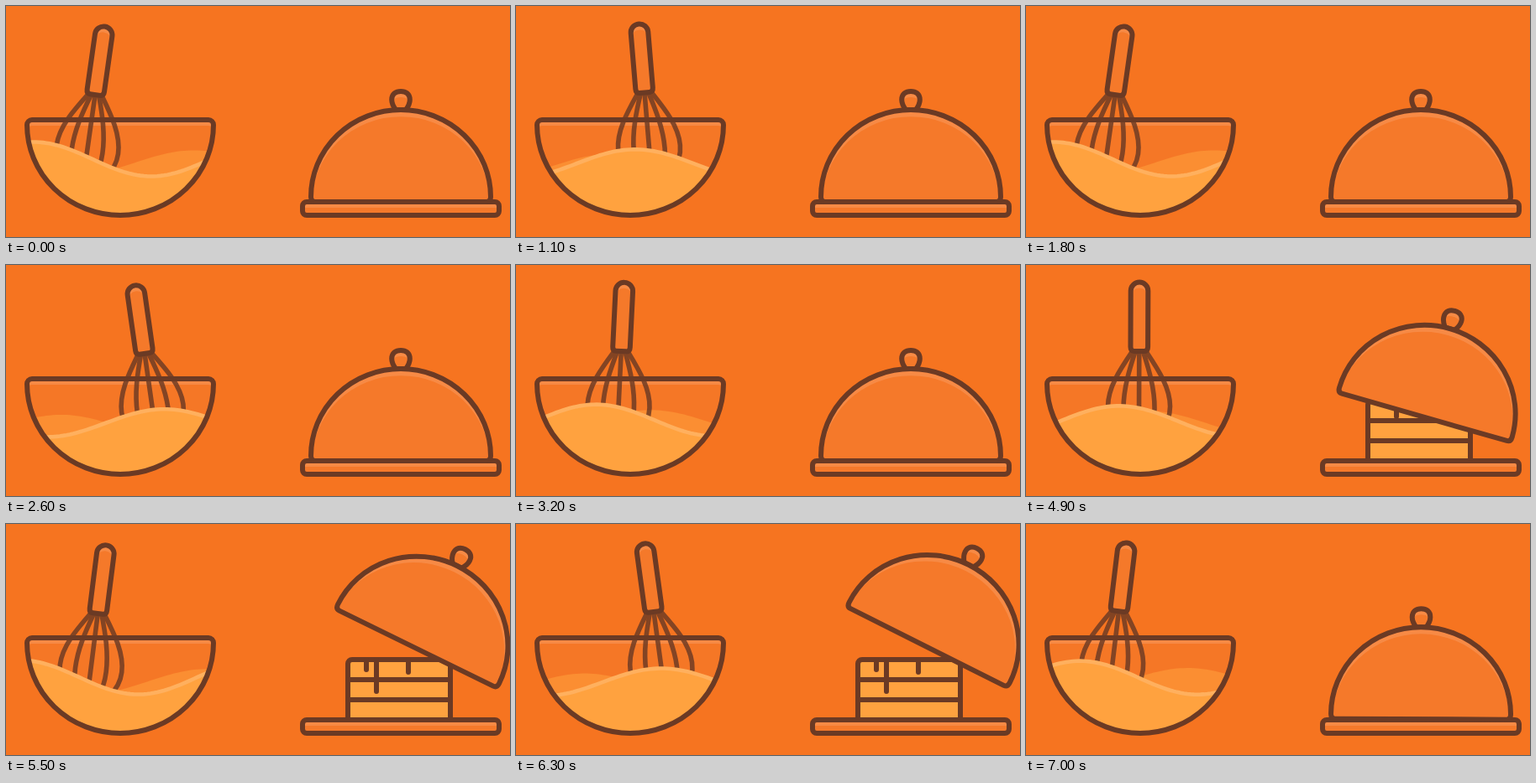
Animation, 600 px wide and 276 px high, one loop 7100 ms. Source, as an HTML page:

```html
<!DOCTYPE html>
<html lang="en">
<head>
<meta charset="utf-8">
<title>Baking</title>
<style>
  html, body { margin: 0; width: 100%; height: 100%; overflow: hidden; background: #f67420; }
  svg { display: block; width: 600px; height: 276px; }
  .line { fill: none; stroke: #6b3a24; stroke-width: 6; stroke-linejoin: round; stroke-linecap: round; }
  .thin { stroke-width: 5.6; }
  .glass { fill: #f5792a; }
  .bowl { fill: #f57726; }
  .shine { fill: #f78a45; }
  .batter { fill: #ffa23f; }
</style>
</head>
<body>
<svg viewBox="0 0 600 276">
  <defs>
    <path id="bowl" d="M31 136H241a6 6 0 0 1 6 6A111 108 0 0 1 25 142a6 6 0 0 1 6-6z"/>
    <path id="dome" d="M-102 0Q-107 0-107-6A107 104 0 0 1 107-6Q107 0 102 0z"/>
    <path id="knob" d="M-6-110C-9-114-10.800-118-10.800-122C-10.800-129-6-132 0-132S10.800-129 10.800-122C10.800-118 9-114 6-110z"/>
    <path id="grip" d="M-10.3-75a10.3 10.3 0 0 1 20.6 0L10.3-8Q10.3-3 6-3H-6Q-10.3-3-10.3-8z"/>
    <rect id="plate" x="353" y="234" width="234" height="16" rx="5"/>
    <clipPath id="bowlClip"><use href="#bowl"/></clipPath>
    <clipPath id="domeClip"><use href="#dome"/></clipPath>
    <clipPath id="knobClip"><use href="#knob"/></clipPath>
    <clipPath id="gripClip"><use href="#grip"/></clipPath>
    <clipPath id="plateClip"><use href="#plate"/></clipPath>
  </defs>

  <g clip-path="url(#bowlClip)">
    <use href="#bowl" class="shine"/>
    <use href="#bowl" class="bowl" y="7"/>
    <path id="back" fill="#fb8e32"/>
  </g>

  <g id="whisk">
    <g class="line thin" opacity=".82">
      <path d="M-8-3C-22 18-37 40-37 63C-37 85-20 105 0 105S37 85 37 63C37 40 22 18 8-3"/>
      <path d="M-4.5-3C-12 20-18.500 42-18.500 65C-18.500 88-10 105 0 105S18.500 88 18.500 65C18.500 42 12 20 4.500-3"/>
      <path d="M0-3V105"/>
    </g>
    <g clip-path="url(#gripClip)">
      <use href="#grip" class="shine"/>
      <use href="#grip" class="glass" y="7"/>
    </g>
    <use href="#grip" class="line"/>
  </g>

  <g clip-path="url(#bowlClip)">
    <path id="front" class="batter"/>
    <path id="crest" fill="none" stroke="#ffb05e" stroke-width="4.6"/>
  </g>
  <use href="#bowl" class="line"/>

  <rect class="batter" x="407" y="162" width="122" height="76" rx="5"/>
  <g class="line">
    <rect x="407" y="162" width="122" height="76" rx="5"/>
    <path d="M407 186H529M407 210H529"/>
    <path id="drips"/>
  </g>
  <g clip-path="url(#plateClip)">
    <use href="#plate" class="shine"/>
    <use href="#plate" class="glass" y="7"/>
  </g>
  <use href="#plate" class="line"/>

  <g id="lid">
    <g clip-path="url(#knobClip)">
      <use href="#knob" class="shine"/>
      <use href="#knob" class="glass" y="7"/>
    </g>
    <use href="#knob" class="line"/>
    <g clip-path="url(#domeClip)">
      <use href="#dome" class="shine"/>
      <use href="#dome" class="glass" transform="translate(0 7) scale(.99)"/>
    </g>
    <use href="#dome" class="line"/>
  </g>
</svg>
<script>
  const LOOP = 7100, STIR = 1800, TAU = Math.PI * 2;
  const el = id => document.getElementById(id);
  const [back, front, crest, whisk, lid, drips] =
    ['back', 'front', 'crest', 'whisk', 'lid', 'drips'].map(el);

  const ramp = (t, a, b) => Math.min(1, Math.max(0, (t - a) / (b - a)));
  const ease = u => (1 - Math.cos(Math.PI * u)) / 2;

  function surface(peak, length, mid, amp) {
    let d = '';
    for (let x = 20; x <= 252; x += 4) {
      const y = mid - amp * Math.cos(TAU * (x - peak) / length);
      d += (d ? 'L' : 'M') + x + ' ' + y.toFixed(2);
    }
    return d;
  }
  const fill = d => d + 'V260H20z';

  function drawBowl(t) {
    const turn = t / STIR, a = TAU * turn;
    const sway = Math.cos(a);
    const top = surface(313 - 280 * turn, 280, 186 - 3 * sway, 18.5 + 2 * sway);
    front.setAttribute('d', fill(top));
    crest.setAttribute('d', top);
    back.setAttribute('d',
      fill(surface(224 + 285 * turn, 285, 190.5 - 3.5 * Math.cos(a + 0.5), 15)));

    // the stroke to the right is a little quicker than the one back
    const RIGHT = 845, u = (t + 30) % STIR;
    const swing = Math.PI * (ramp(u, 0, RIGHT) + ramp(u, RIGHT, STIR));
    const c = Math.cos(swing), s = Math.sin(swing);
    whisk.setAttribute('transform',
      `translate(${135.5 - 30 * c} ${108.7 + 2.8 * s}) rotate(${8.1 * c})`);
  }

  // x, length, start and end of growth
  const DRIPS = [[429, 12, 4850, 5500], [441, 38, 4300, 5500], [479, 15, 4700, 5500]];

  function drawCake(t) {
    const open = ease(ramp(t, 3930, 5650)) * (1 - ease(ramp(t, 6390, 7040)));
    lid.setAttribute('transform',
      `translate(${470 + 19.5 * open ** 3} ${234 - 87 * open}) rotate(${26.7 * open})`);
    drips.setAttribute('d', DRIPS.map(([x, len, a, b]) =>
      `M${x} 162v${len * ramp(t, a, b)}`).join(''));
  }

  let start;
  function tick(now) {
    start ??= now;
    const t = Math.max(0, now - start) % LOOP;
    drawBowl(t);
    drawCake(t);
    requestAnimationFrame(tick);
  }
  drawBowl(0);
  drawCake(0);
  requestAnimationFrame(tick);
</script>
</body>
</html>
```
